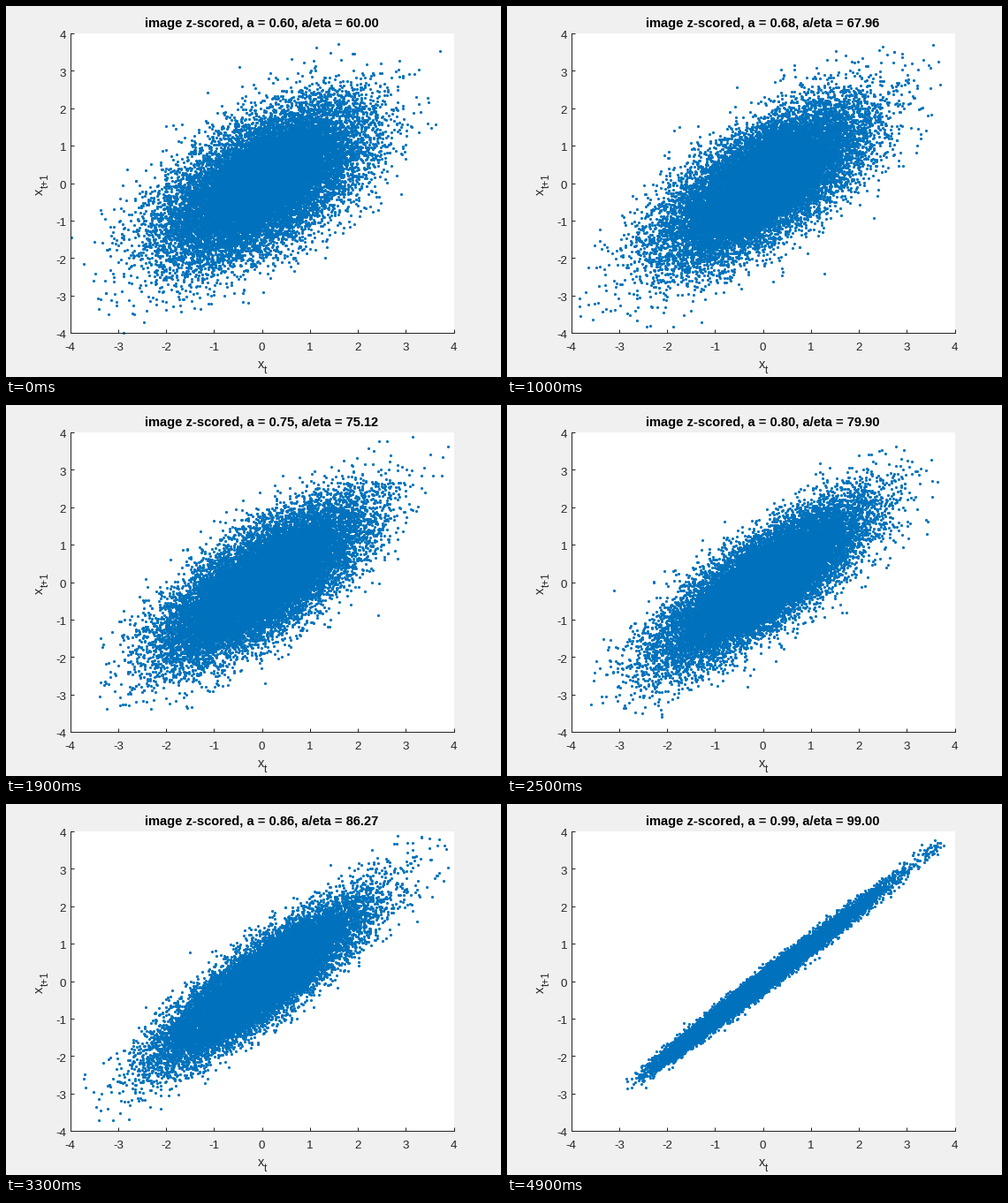
Animation of 560 by 420 pixels, one loop 5000 ms. Source, as a matplotlib script:

```python
import numpy as np
import matplotlib.pyplot as plt
from matplotlib.animation import FuncAnimation

W, H, DPI = 560, 420, 100
LEFT, RIGHT, TOP, BOTTOM = 72.8, 506.5, 30.9, 370.3
FRAMES, SAMPLES = 50, 20000
ETA = 0.01
PT = 72 / DPI  # points per pixel
INK = "#262626"

plt.rcParams["font.family"] = "Liberation Sans"


def autoregressive(coeffs, samples, seed):
    """One z-scored AR(1) series per coefficient, one per column."""
    rng = np.random.default_rng(seed)
    noise = rng.standard_normal((samples, len(coeffs)))
    series = np.empty_like(noise)
    series[0] = noise[0]
    gain = np.sqrt(1 - coeffs**2)
    for t in range(1, samples):
        series[t] = coeffs * series[t - 1] + gain * noise[t]
    return (series - series.mean(axis=0)) / series.std(axis=0)


def label(x, y, text, size, **style):
    """Text with its baseline at pixel (x, y), measured from the top left."""
    style = {"color": INK, "va": "baseline", **style}
    return fig.text(x / W, 1 - y / H, text, fontsize=size * PT,
                    rotation_mode="anchor", **style)


coeffs = np.linspace(0.6, 0.99, FRAMES)
series = autoregressive(coeffs, SAMPLES, seed=7)

fig = plt.figure(figsize=(W / DPI, H / DPI), dpi=DPI, facecolor="#f0f0f0")
ax = fig.add_axes([LEFT / W, 1 - BOTTOM / H,
                   (RIGHT - LEFT) / W, (BOTTOM - TOP) / H])
ax.set(xlim=(-4, 4), ylim=(-4, 4), xticks=range(-4, 5), yticks=range(-4, 5))
ax.spines[["top", "right"]].set_visible(False)
for side in ("left", "bottom"):
    ax.spines[side].set(color=INK, linewidth=PT)
ax.tick_params(direction="in", length=4.3 * PT, width=PT, color=INK,
               labelbottom=False, labelleft=False)

for value in range(-4, 5):
    part = (value + 4) / 8
    label(LEFT + part * (RIGHT - LEFT), 390.5, str(value), 13.33, ha="center")
    label(68, BOTTOM - part * (BOTTOM - TOP) + 6.2, str(value), 13.33,
          ha="right")

label(284.6, 410, "x", 14.67)
label(292, 416, "t", 11.7)
label(42, 213.5, "x", 14.67, rotation=90)
label(48, 206, "t+1", 11.7, rotation=90)
title = label(289.5, 24, "", 14.6, ha="center", weight="bold", color="black")

dots, = ax.plot([], [], "o", color="#0072bd", markersize=3.15 * PT,
                markeredgewidth=0, clip_on=False)


def draw(frame):
    a = coeffs[frame]
    now, following = series[:-1, frame], series[1:, frame]
    inside = (abs(now) <= 4) & (abs(following) <= 4)
    dots.set_data(now[inside], following[inside])
    title.set_text(f"image z-scored, a = {a:.2f}, a/eta = {a / ETA:.2f}")
    return dots, title


animation = FuncAnimation(fig, draw, frames=FRAMES, interval=100, repeat=True)
plt.show()
```
